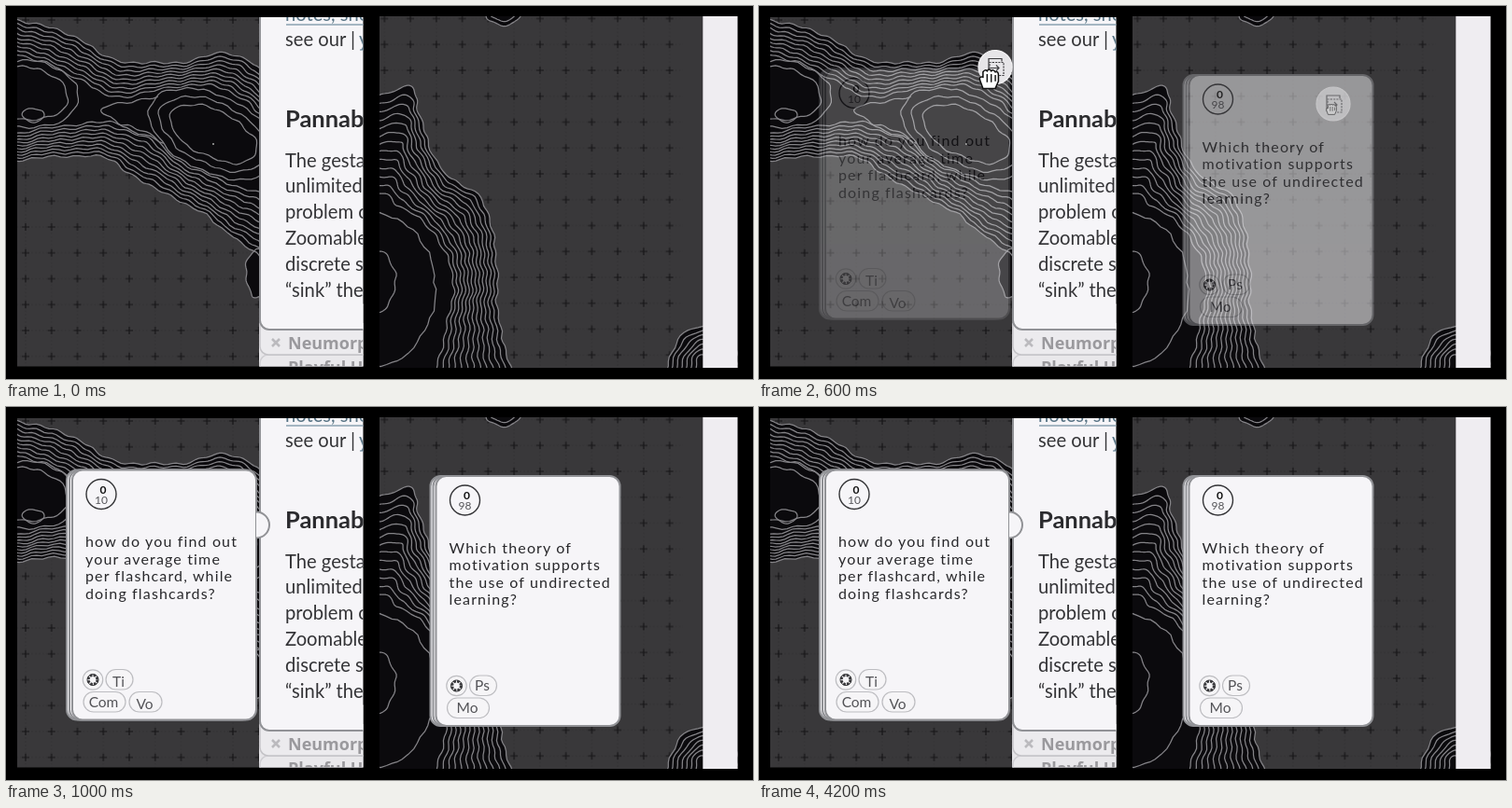
Animation, 800 px wide and 400 px high, one loop 4300 ms. Source, as an HTML page:

```html
<!DOCTYPE html>
<html lang="en">
<head>
<meta charset="utf-8">
<title>Dragging flashcards onto a canvas</title>
<style>
  html, body { margin: 0; width: 100%; height: 100%; overflow: hidden; background: #000; }
  svg { display: block; }
  text { font-family: Lato, "Noto Sans", sans-serif; white-space: pre; }
  .line { fill: none; stroke: #858488; stroke-width: 1.25; }
  .land { fill: #0b0a0d; stroke: none; }
  .body { font-size: 20.2px; fill: #343437; }
  .link { fill: #577384; }
  .heading { font-size: 25.5px; font-weight: 700; fill: #2b2b2e; }
  .tab { font: 600 18px "Noto Sans", sans-serif; fill: #9a999d; }
  .question { font-size: 16px; letter-spacing: 1.15px; fill: #28282b; }
  .tag { font-size: 15.5px; fill: #535357; text-anchor: middle; }
  .count { font-size: 12px; fill: #56565a; text-anchor: middle; }
  .zero { font-size: 12px; font-weight: 700; fill: #111; text-anchor: middle; }
  .pill { fill: #f6f5f7; stroke: #bdbdc1; stroke-width: 1.2; }
  .sheet { fill: #f6f5f8; stroke: #919296; stroke-width: 2; }
  .icon { fill: none; stroke: #3b3b3e; stroke-width: 1.2; }
</style>
</head>
<body>
<svg id="stage" width="800" height="400" viewBox="0 0 800 400"></svg>
<script>
const LOOP = 4300, STEP = 100, CELL = 27.75;
const stage = document.getElementById('stage');
const clamp = v => Math.max(0, Math.min(1, v));
const mix = (a, b, k) => a + (b - a) * k;
const range = n => [...Array(n).keys()];
const points = text => text.split(' ').map(p => p.split(',').map(Number));

// Every contour passes through the same gentle warp, so neighbours stay parallel.
const warp = ([x, y]) => [
  x + 1.1 * Math.sin(y * 0.31 + 1) + 0.8 * Math.sin(y * 0.13 + x * 0.05),
  y + 1.1 * Math.sin(x * 0.27 + y * 0.1) + 0.8 * Math.sin(x * 0.11)
];

// Catmull-Rom samples through a few key points.
function curve(keys) {
  const at = i => keys[Math.max(0, Math.min(keys.length - 1, i))];
  return range((keys.length - 1) * 16 + 1).map(s => {
    const i = Math.floor(s / 16), u = s / 16 - i;
    const [a, b, c, d] = [at(i - 1), at(i), at(i + 1), at(i + 2)];
    return warp([0, 1].map(k => b[k] + u / 2 * (c[k] - a[k] +
      u * (2 * a[k] - 5 * b[k] + 4 * c[k] - d[k] + u * (3 * (b[k] - c[k]) + d[k] - a[k])))));
  });
}
function ellipse(cx, cy, rx, ry, turn = 0) {
  const [c, s] = [Math.cos(turn), Math.sin(turn)];
  return range(64).map(i => {
    const x = rx * Math.cos(i * Math.PI / 32), y = ry * Math.sin(i * Math.PI / 32);
    return warp([cx + x * c - y * s, cy + x * s + y * c]);
  });
}
const toPath = samples => 'M' + samples.map(p => p.map(v => v.toFixed(1))).join('L');
const line = samples => `<path class="line" d="${toPath(samples)}"/>`;
const land = samples => `<path class="land" d="${toPath(samples)}Z"/>`;
const ring = (...shape) => `<path class="line" d="${toPath(ellipse(...shape))}Z"/>`;
const slope = (outer, inner, n) => range(n).map(i =>
  line(curve(outer.map((p, j) => p.map((v, k) => mix(v, inner[j][k], i / (n - 1))))))).join('');
const hill = (cx, cy, rx, ry, gap, n) => land(ellipse(cx, cy, rx, ry)) +
  range(n).map(i => ring(cx, cy, rx - gap * i, ry - gap * i)).join('');

const grid = (id, x, y) => `
  <pattern id="${id}" x="${x - CELL / 2}" y="${y - CELL / 2}" width="${CELL}" height="${CELL}" patternUnits="userSpaceOnUse">
    <rect width="28" height="28" fill="#39383a"/>
    <g transform="translate(${CELL / 2} ${CELL / 2})" fill="none">
      <path d="M-14 0H14M0-14V14" stroke="#323133" stroke-dasharray="2 2"/>
      <path d="M-4 0H4M0-4V4" stroke="#161517" stroke-width="1.2"/>
    </g>
  </pattern>`;
const pane = (x, y, w, h, content) =>
  `<svg x="${x}" y="${y}" width="${w}" height="${h}" viewBox="${x} ${y} ${w} ${h}">${content}</svg>`;
const label = (cls, x, y, text) => `<text class="${cls}" x="${x}" y="${y}">${text}</text>`;

function leftMap() {
  const top = points('10,14 70,31 118,58 190,60 238,50 273,69');
  const topIn = points('10,50 70,74 118,97 190,85 238,90 273,117');
  const low = points('10,165 100,162 150,191 205,219 273,270');
  const lowIn = points('10,137 95,125 145,133 195,172 273,202');
  return '<path fill="url(#gridLeft)" d="M12 12h260v375H12z"/>' +
    land([...curve(top), ...curve(low).reverse()]) + hill(270, 288, 13, 26, 0, 1) +
    slope(top, topIn, 9) + slope(low, lowIn, 10) +
    ring(24, 94, 54, 36, 0.1) + ring(20, 93, 47, 28, 0.2) + ring(30, 117, 12, 7) +
    line(curve(points('162,98 102,112 168,148'))) +
    range(3).map(i => ring(222, 137, 50 + 12 * i, 25 + 8 * i, 0.45)).join('') +
    '<circle cx="222" cy="148" r="1" fill="#aaa"/>';
}

function rightMap() {
  const outer = points('398,97 434,87 444,122 466,174 511,211 525,270 527,330 541,392');
  const inner = points('398,200 409,203 420,213 443,229 463,250 479,290 474,335 460,392');
  return `<path fill="url(#gridRight)" d="M400 11h383v377H400z"/>
    <path fill="#39383a" d="M725 11h22v377h-22z"/>` +
    land([...curve(outer), [398, 392]]) + slope(outer, inner, 13) +
    ring(393, 304, 67, 82) + ring(398, 295, 19, 33) +
    hill(748, 397, 40, 54, 5, 7) + hill(534, 8, 20, 12, 5, 2) +
    '<path fill="#efedf1" d="M746.3 11h38v377h-38z"/>';
}

function article() {
  const rows = ['The gestalt', 'unlimited', 'problem of', 'Zoomable', 'discrete st', '“sink” the'];
  return `<path fill="#e6e5e8" d="M271 340h120v50H271z"/>
    <rect x="272" y="374" width="130" height="40" rx="9" fill="#e9e8eb" stroke="#cfced2" stroke-width="1.5"/>
    <rect x="272" y="320" width="130" height="54" rx="9" fill="#ecebee" stroke="#c4c3c7" stroke-width="1.5"/>
    <rect class="sheet" x="272" y="-20" width="130" height="367" rx="10"/>
    <path d="M300 20H390M379 47h8" stroke="#8ba3b1" stroke-width="1.3"/>
    <path d="M285 357l8 8m0-8l-8 8" stroke="#bbbabe" stroke-width="2.6"/>` +
    label('body link', 299, 16, 'notes, show') + label('body', 299, 42.5, 'see our |') +
    label('body link', 378, 42.5, 'y') + label('heading', 299, 129.5, 'Pannable') +
    rows.map((row, i) => label('body', 299, 172.5 + 27.8 * i, row)).join('') +
    label('tab', 302, 367.5, 'Neumorphic') + label('tab', 302, 394, 'Playful UI');
}

const pill = (x, y, w, text, dy = 0) =>
  `<rect class="pill" x="${x}" y="${y}" width="${w}" height="21.5" rx="10.7"/>` +
  label('tag', x + w / 2 - 1, y + 16 + dy, text);

function card(id, x, y, rows, count, extras) {
  return `<g id="${id}"><g transform="translate(${x} ${y})">` +
    [-6, -3, 0].map(dx => `<rect class="sheet" x="${dx}" width="197" height="268" rx="11"/>`).join('') +
    '<circle cx="31" cy="26" r="16" fill="none" stroke="#333336" stroke-width="1.4"/>' +
    label('count', 31, 36, count) + label('zero', 33, 25, '0') +
    rows.map((row, i) => label('question', 14, 82.5 + 18.6 * i, row)).join('') +
    `<circle class="pill" cx="22" cy="225" r="10.7"/>
     <circle cx="22" cy="225" r="4.8" fill="none" stroke="#37373a" stroke-width="2.8" stroke-dasharray="2.6 1.17"/>
     <circle cx="22" cy="225" r="6" fill="none" stroke="#37373a"/>` + extras + '</g></g>';
}

const hand = `<path d="M-6 9 L-9 1 Q-10 -3 -6 -2 V-7 Q-4 -10 -2 -8 Q0 -11 2 -8 Q4 -10 6 -7 Q9 -8 9 -4 V2 L6 9Z"
    fill="#fff" stroke="#111" stroke-width="1.4"/>
  <path d="M-2 -5V3M2 -5V3M6 -4V2" stroke="#111" stroke-width="1.3"/>`;
const handle = id => `<g id="${id}">
  <circle r="18" fill="#e6e5e8" stroke="#f4f3f5" stroke-width="1.2"/>
  <path class="icon" d="M-7 8V-9H7V-6"/>
  <path class="icon" stroke-dasharray="2 1.2" d="M-3 -5H9V9H-6V-5Z"/>
  <path class="icon" d="M-5 1H4M1 -2L4 1L1 4"/>
  <g id="${id}Hand">${hand}</g></g>`;

const bump = '<path id="bump" class="sheet" d="M197 45a14 14 0 0 1 0 28"/>';
stage.innerHTML = `<defs>${grid('gridLeft', 21, 15)}${grid('gridRight', 405.4, 13.5)}</defs>
  <rect width="800" height="400"/>` +
  pane(12, 12, 370.5, 374.5, leftMap() + article() +
    card('leftCard', 71, 67.5, ['how do you find out', 'your average time', 'per flashcard, while', 'doing flashcards?'], '10',
      bump + pill(36, 214, 29, 'Ti', 2) + pill(12, 238, 45, 'Com') + pill(61, 238, 35, 'Vo', 2)) + handle('leftHandle')) +
  pane(400, 11, 383.5, 377, rightMap() +
    card('rightCard', 460.5, 74, ['Which theory of', 'motivation supports', 'the use of undirected', 'learning?'], '98',
      pill(36, 214, 29, 'Ps') + pill(12, 238, 45, 'Mo')) + handle('rightHandle'));

const el = Object.fromEntries([...stage.querySelectorAll('g[id], path[id]')].map(e => [e.id, e]));
const fade = (node, value) => node.setAttribute('opacity', clamp(value));
const place = (node, x, y, scale = 1) =>
  node.setAttribute('transform', `translate(${x} ${y}) scale(${scale})`);

function draw(now) {
  const t = Math.floor(now % LOOP / STEP) * STEP;
  const pull = 1 - (1 - clamp((t - 100) / 400)) ** 2;
  const drop = clamp((t - 500) / 200);

  place(el.leftHandle, mix(mix(345, 265, pull), 241, drop), mix(mix(38, 55, pull), 76, drop));
  place(el.leftHandleHand, mix(-11, -2, drop), mix(15, 11, drop), 1.1);
  fade(el.leftHandle, Math.min((t - 100) / 200, (900 - t) / 200));
  fade(el.leftCard, (t - 500) / 400);
  fade(el.bump, (t - 700) / 200);

  place(el.rightHandle, mix(762, 615, pull), mix(90, 105, pull));
  place(el.rightHandleHand, -2, 6, 0.6);
  fade(el.rightHandle, Math.min((t - 100) / 200, (700 - t) / 200));
  fade(el.rightCard, (t - 500) / 200);
  requestAnimationFrame(() => draw(performance.now() - start));
}
const start = performance.now();
draw(0);
</script>
</body>
</html>
```
